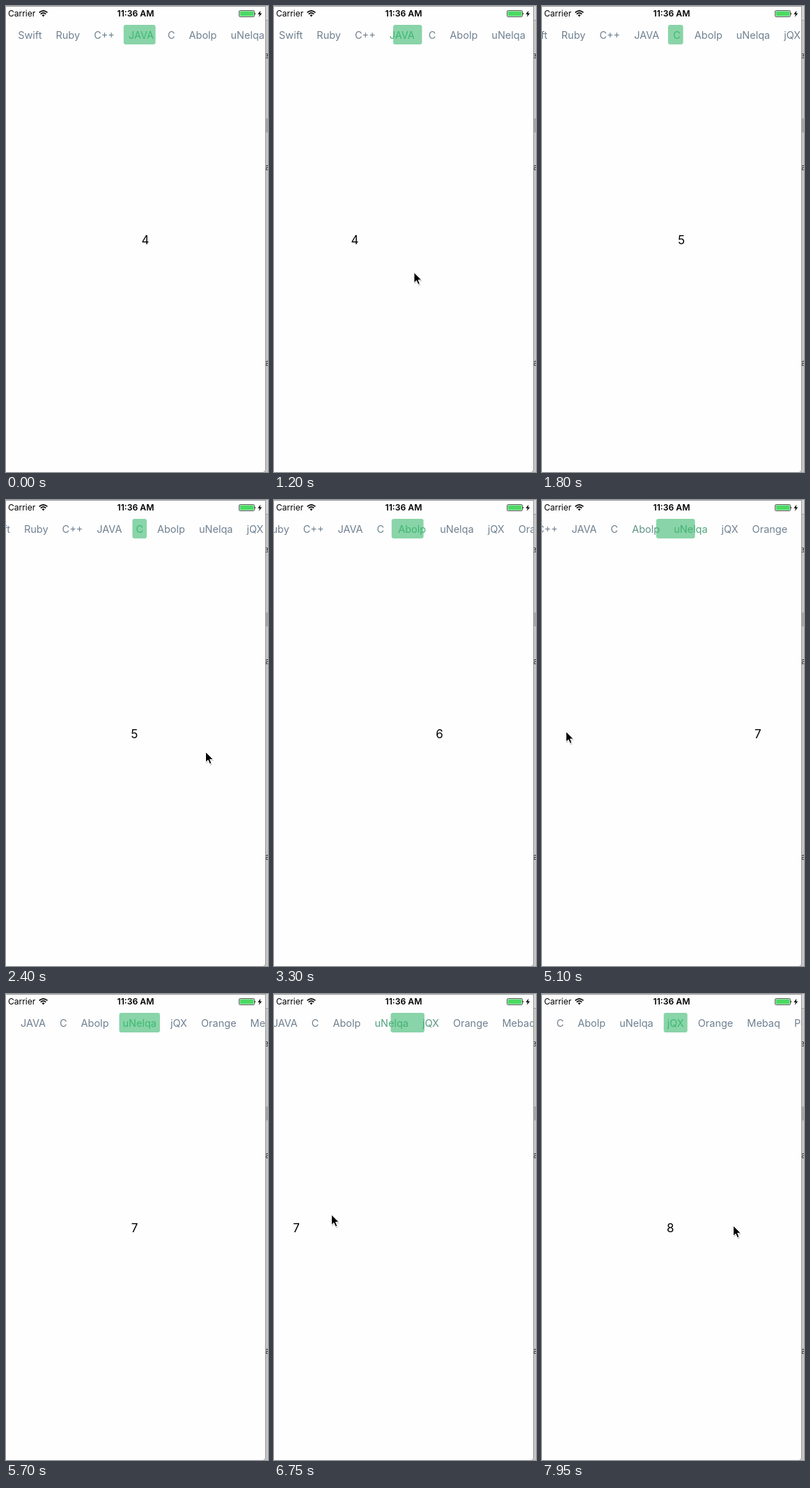
Animation of 376x667 px, one loop 8 s. Source, as an HTML page:

```html
<!DOCTYPE html>
<html lang="en">
<head>
<meta charset="utf-8">
<title>Paged tab strip</title>
<style>
  html, body { margin: 0; width: 100%; height: 100%; overflow: hidden; background: #c6c6c6; }
  svg { display: block; width: 376px; height: 667px; }
  text { font-family: Inter, Roboto, sans-serif; }
  #tabs text { font-size: 14.5px; text-anchor: middle; }
  #pages text { font-size: 17px; text-anchor: middle; }
  #status-bar text { font-size: 12px; }
  #status-bar .clock { font-size: 12.2px; font-weight: 600; text-anchor: middle; }
</style>
</head>
<body>
<svg viewBox="0 0 376 667">
  <defs><clipPath id="screen"><rect width="372.5" height="667"/></clipPath></defs>

  <g id="desktop">
    <rect width="376" height="667" fill="#c6c6c6"/>
    <rect x="372" width="4" height="20" fill="#d6d6d6"/>
    <rect x="372" y="20" width="4" height="1" fill="#9c9c9c"/>
    <rect x="372" y="161" width="4" height="20" fill="#a6a6a6"/>
    <g font-size="11" fill="#222">
      <text x="370.5" y="75">e</text>
      <text x="372" y="235">a</text>
      <text x="372" y="515">a</text>
    </g>
  </g>

  <path d="M0 0H373V663Q373 667 369 667H0Z" fill="#989898"/>
  <path d="M0 1H372V663Q372 667 368 667H0Z" fill="#fefefe"/>

  <g id="status-bar">
    <text x="3" y="15.3">Carrier</text>
    <g fill="none" stroke="#000" stroke-width="1.7">
      <path d="M47.6 9.3Q53.5 4.3 59.4 9.3"/>
      <path d="M49.7 11.6Q53.5 8.3 57.3 11.6"/>
    </g>
    <path d="M51.5 13.1Q53.5 11.5 55.5 13.1L53.5 15.4Z"/>
    <text class="clock" x="186" y="15.3">11:36 AM</text>
    <rect x="334.5" y="6.5" width="22" height="9" rx="1.6" fill="#fff" stroke="#333" stroke-width=".8"/>
    <rect x="335.5" y="7.5" width="20" height="7" rx=".8" fill="#4cd964"/>
    <path d="M357.3 9.5Q359.2 11 357.3 12.6Z"/>
    <path d="M365.5 6.5L361.3 11.7H364L362.7 15.8L367.3 10.4H364.5Z"/>
  </g>

  <g clip-path="url(#screen)">
    <g id="tabs"></g>
    <rect id="pill" y="27" height="28" rx="3" fill="#3cba71" fill-opacity=".6"/>
    <g id="pages"></g>
  </g>

  <g id="cursor">
    <path d="M0 0V15.5L3.6 12.3L6 18L8.8 16.8L6.4 11.4H11.2Z" transform="translate(.6 1.4)" opacity=".18"/>
    <path d="M0 0V15L3.5 11.8L5.8 17.2L8.4 16.1L6.1 10.8H10.8Z" stroke="#fff"/>
  </g>
</svg>

<script>
const LOOP = 8000, STEP = 150, PAGE_WIDTH = 372, FIRST_PAGE = 2;
const GAP = 20, PADDING = 5, TAB_CENTER = 191.7, PAGE_CENTER = 184.3;
const GREY = [112, 128, 144], GREEN = [60, 186, 113];
const RETURN_TIME = 600, HIDDEN_X = -12;

const names = ['Swift', 'Ruby', 'C++', 'JAVA', 'C', 'Abolp', 'uNelqa', 'jQX', 'Orange', 'Mebaq', 'Pear'];

// The pointer rests at (x, y) for `rest` ms, then drags one page from `start` on.
const swipes = [
  { start: -750, rest: 300, x: 270, y: 396 },
  { start: 1050, rest: 300, x: 276, y: 385 },
  { start: 2700, rest: 300, x: 286.5, y: 360.5 },
  { start: 4650, rest: 300, x: 305.5, y: 344.5 },
  { start: 6450, rest: 150, x: 250, y: 324 },
  { start: 8250, rest: 600, x: 274.5, y: 331.5 }
];

const byId = id => document.getElementById(id);
const mix = (a, b, k) => a + (b - a) * k;
const clamp = k => Math.min(1, Math.max(0, k));
const smooth = k => k * k * (3 - 2 * k);

// Share of a page turned: gathers speed under the finger, then glides to rest.
const turned = ms => ms < 0 ? 0 : 1 - Math.exp(-(((ms + 250) / 681) ** 3));

function addText(parent, content, y) {
  const node = document.createElementNS('http://www.w3.org/2000/svg', 'text');
  node.textContent = content;
  node.setAttribute('y', y);
  return byId(parent).appendChild(node);
}

let left = 0;
const tabs = names.map((name, i) => {
  const label = addText('tabs', name, 46.5);
  const page = addText('pages', i + 1, 341);
  const width = label.getComputedTextLength();
  const center = left + width / 2;
  left += width + GAP;
  return { label, page, width, center };
});

function pointerAt(t) {
  const i = swipes.findLastIndex(swipe => t >= swipe.start);
  const swipe = swipes[i], next = swipes[i + 1];
  const drag = turned(t - swipe.start);
  const x = Math.max(HIDDEN_X, swipe.x - drag * PAGE_WIDTH * 1.1);
  const y = swipe.y - drag * 20;
  const back = smooth(clamp((t - next.start + next.rest) / RETURN_TIME + 1));
  return [mix(x, next.x, back), mix(y, next.y, back)];
}

function render(t) {
  const position = swipes.reduce((sum, swipe) => sum + turned(t - swipe.start), FIRST_PAGE);
  const from = Math.floor(position);
  const between = key => mix(tabs[from][key], tabs[from + 1][key], position - from);

  const shift = TAB_CENTER - between('center');
  tabs.forEach((tab, i) => {
    const active = clamp(1 - Math.abs(i - position));
    const color = GREY.map((c, j) => Math.round(mix(c, GREEN[j], active)));
    tab.label.setAttribute('x', tab.center + shift);
    tab.label.setAttribute('fill', `rgb(${color})`);
    tab.page.setAttribute('x', PAGE_CENTER + (i - position) * PAGE_WIDTH);
  });

  const pillWidth = between('width') + 2 * PADDING;
  byId('pill').setAttribute('x', TAB_CENTER - pillWidth / 2);
  byId('pill').setAttribute('width', pillWidth);
  byId('cursor').setAttribute('transform', `translate(${pointerAt(t)})`);
}

const origin = performance.now();
function tick() {
  const t = (performance.now() - origin) % LOOP;
  render(Math.floor(t / STEP) * STEP);
  requestAnimationFrame(tick);
}
tick();
</script>
</body>
</html>
```
